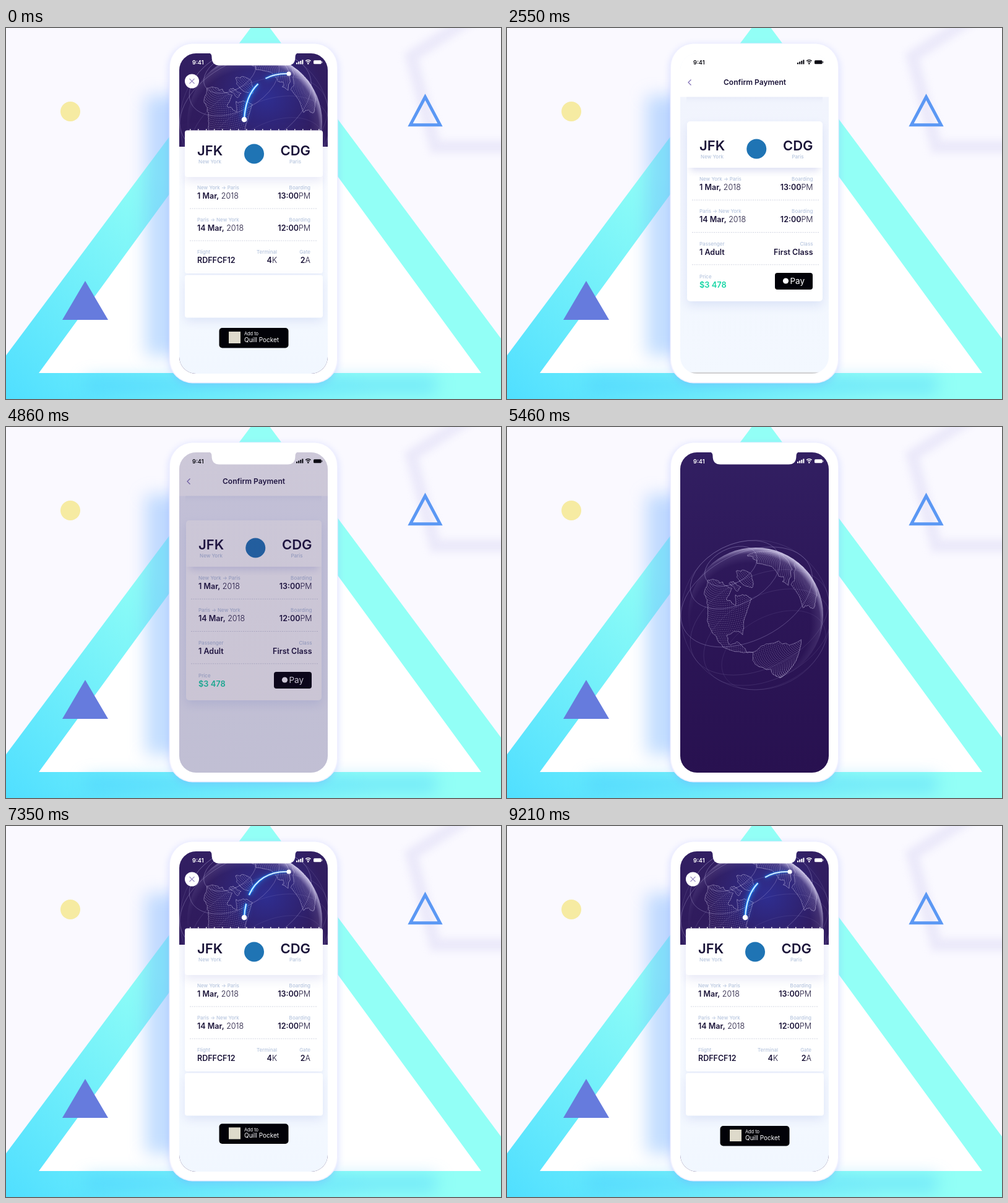
Recreate the animation shown at these times as an HTML page with a canvas. Size 800 by 600 pixels, loop 9.24 s.

```html
<!DOCTYPE html>
<html lang="en">
<head>
<meta charset="utf-8">
<title>Boarding pass payment</title>
<style>
  html, body { margin: 0; width: 100%; height: 100%; overflow: hidden; background: #faf9ff; }
  canvas { display: block; }
</style>
</head>
<body>
<canvas id="stage" width="800" height="600"></canvas>
<script>
const LOOP = 9240, INK = '#1a1338', MUTED = '#b6c5de', BLUE = '#1583f5', GREY = '#929296';
const RAD = Math.PI / 180;
const stage = document.getElementById('stage');
let c = stage.getContext('2d');
let t = 0;

// timing
const seg = (a, b) => Math.min(1, Math.max(0, (t - a) / (b - a)));
const easeOut = u => 1 - (1 - u) ** 3;
const easeInOut = u => u < .5 ? 4 * u ** 3 : 1 - (2 - 2 * u) ** 3 / 2;

// drawing helpers
function group(alpha, dx, dy, draw) {
  if (alpha <= 0) return;
  c.save();
  c.globalAlpha *= alpha;
  c.translate(dx, dy);
  draw();
  c.restore();
}
function box(x, y, w, h, r, fill, shadow, blur = 16, drop = 7) {
  c.save();
  if (shadow) {
    c.shadowColor = shadow;
    c.shadowBlur = blur;
    c.shadowOffsetY = drop;
  }
  c.fillStyle = fill;
  c.beginPath();
  c.roundRect(x, y, w, h, r);
  c.fill();
  c.restore();
}
function dot(x, y, r, fill) {
  c.fillStyle = fill;
  c.beginPath();
  c.arc(x, y, r, 0, 7);
  c.fill();
}
function line(points, color, width = 1, dash = []) {
  c.strokeStyle = color;
  c.lineWidth = width;
  c.setLineDash(dash);
  c.beginPath();
  points.forEach(p => c.lineTo(...p));
  c.stroke();
  c.setLineDash([]);
}
function poly(points, fill) {
  c.fillStyle = fill;
  c.beginPath();
  points.forEach(p => c.lineTo(...p));
  c.fill();
}
function fade(x0, y0, x1, y1, ...colors) {
  const g = c.createLinearGradient(x0, y0, x1, y1);
  colors.forEach((k, i) => g.addColorStop(i / (colors.length - 1), k));
  return g;
}
const setFont = (weight, size) => c.font = `${weight} ${size}px Inter, "Open Sans", sans-serif`;
// y is the middle of the capitals
function text(s, x, y, size, weight, color, align = 'left') {
  setFont(weight, size);
  c.textAlign = align;
  c.fillStyle = color;
  c.fillText(s, x, y + size * .36);
}
function pair(bold, light, x, y, right) {
  setFont(600, 12.5);
  const wb = c.measureText(bold).width;
  setFont(300, 12.5);
  const wl = c.measureText(light).width;
  if (right) x -= wb + wl;
  text(bold, x, y, 12.5, 600, INK);
  text(light, x + wb, y, 12.5, 300, INK);
}
function field(label, bold, light, x, y, right) {
  text(label, x, y, 8, 500, MUTED, right ? 'right' : 'left');
  pair(bold, light, x, y + 13, right);
}
const rule = (x0, x1, y) => line([[x0, y], [x1, y]], '#d3d6e2', 1, [2, 1.5]);

// backdrop, painted once
function paintBackdrop() {
  c.fillStyle = '#faf9ff';
  c.fillRect(0, 0, 800, 600);
  c.filter = 'blur(6px)';
  line([[830, -60], [735, -6], [655, 46], [694, 192], [830, 192]], '#ebe9fa', 20);
  c.filter = 'none';
  poly([[411, -21], [-60, 610], [880, 610]], fade(0, 600, 300, 290, '#50dfff', '#92fff6'));
  poly([[410.5, 68], [53, 558], [768, 558]], '#fff');
  c.filter = 'blur(14px)';
  c.fillStyle = 'rgba(110,175,255,.42)';
  c.fillRect(226, 110, 80, 420);
  c.fillStyle = 'rgba(70,200,255,.5)';
  c.fillRect(130, 567, 565, 22);
  c.filter = 'none';
  dot(104, 135, 16, '#f6eba2');
  poly([[128, 409], [91, 472], [165, 472]], '#667bdd');
  c.strokeStyle = '#5b98f4';
  c.lineWidth = 5;
  c.beginPath();
  [[677.5, 111.5], [653.5, 156.7], [701.5, 156.7]].forEach(p => c.lineTo(...p));
  c.closePath();
  c.stroke();
  box(263.5, 24.5, 273, 550, 38, '#f0f0ff', 'rgba(130,150,255,.3)', 12, 3);
  box(265, 25.5, 270, 547.5, 37, '#fff');
}

// globe: a few corners per land mass, coasts roughened by seeded midpoints
const northAmerica = [
  [-166, 66], [-156, 71], [-95, 71], [-82, 68], [-94, 59], [-80, 52], [-77, 61], [-65, 59],
  [-56, 52], [-66, 46], [-75, 38], [-81, 26], [-84, 30], [-97, 28], [-96, 19], [-88, 21],
  [-83, 9], [-78, 8], [-105, 20], [-118, 34], [-124, 48], [-150, 60]
];
const greenland = [[-60, 77], [-52, 64], [-44, 60], [-22, 70], [-18, 78], [-40, 83]];
const baffin = [[-90, 73], [-74, 73], [-62, 66], [-74, 65]];
const southAmerica = [[-78, 8], [-62, 10], [-35, -6], [-48, -27], [-70, -50], [-71, -18], [-81, -5]];
const africa = [[-17, 15], [-6, 35], [30, 31], [40, 10], [10, 4], [-8, 5]];
const europe = [[-9, 37], [-9, 43], [-1, 44], [-4, 48], [10, 55], [15, 68], [60, 70], [45, 38]];

let seed = 7;
const random = () => (seed = seed * 16807 % 2147483647) / 2147483647;
function roughen(shape) {
  return shape.flatMap(([x, y], i) => {
    const [x2, y2] = shape[(i + 1) % shape.length];
    const shift = (random() - .5) * Math.min(4, .3 * Math.hypot(x2 - x, y2 - y));
    return [[x, y], [(x + x2) / 2 + shift, (y + y2) / 2 + shift]];
  });
}
const lands = [northAmerica, greenland, baffin, southAmerica, africa, europe]
  .map(shape => roughen(roughen(roughen(shape))));

function inside(x, y, shape) {
  let hit = false;
  shape.forEach(([x1, y1], i) => {
    const [x2, y2] = shape[(i + 1) % shape.length];
    if ((y1 > y) !== (y2 > y) && x < (x2 - x1) * (y - y1) / (y2 - y1) + x1) hit = !hit;
  });
  return hit;
}
const landDots = [];
for (let lat = -50; lat < 84; lat += 1.7)
  for (let lon = -170; lon < 60; lon += 1.7 / Math.cos(lat * RAD))
    if (lands.some(s => inside(lon, lat, s))) landDots.push([lon, lat]);

const R = 109, TILT = 38 * RAD, ROLL = 27 * RAD;
function project([lon, lat], lon0) {
  const d = (lon - lon0) * RAD, f = lat * RAD;
  const x = Math.cos(f) * Math.sin(d);
  const y = Math.sin(TILT) * Math.cos(f) * Math.cos(d) - Math.cos(TILT) * Math.sin(f);
  const z = Math.sin(TILT) * Math.sin(f) + Math.cos(TILT) * Math.cos(f) * Math.cos(d);
  return [
    R * (x * Math.cos(ROLL) + y * Math.sin(ROLL)),
    R * (y * Math.cos(ROLL) - x * Math.sin(ROLL)),
    z
  ];
}
function orbit(lat, alpha) {
  const r = 121 * Math.cos(lat * RAD), up = 121 * Math.sin(lat * RAD) * Math.cos(TILT);
  c.strokeStyle = `rgba(200,190,235,${alpha})`;
  c.lineWidth = .9;
  c.beginPath();
  c.ellipse(-up * Math.sin(ROLL), -up * Math.cos(ROLL), r, r * Math.sin(TILT), -ROLL, 0, 7);
  c.stroke();
}
function drawGlobe(lon0) {
  const glow = c.createRadialGradient(18, -40, 0, 18, -40, 95);
  glow.addColorStop(0, `rgba(44,70,215,${.42 * seg(5660, 6700)})`);
  glow.addColorStop(1, 'rgba(44,70,215,0)');
  c.fillStyle = glow;
  c.fillRect(-122, -140, 244, 240);

  const rim = c.createRadialGradient(-8, 13, R - 12, -8, 13, R + 15);
  rim.addColorStop(0, 'rgba(200,190,235,0)');
  rim.addColorStop(.55, 'rgba(205,195,240,.12)');
  rim.addColorStop(1, 'rgba(235,230,255,.85)');
  dot(0, 0, R, rim);

  c.fillStyle = 'rgba(222,215,245,.55)';
  landDots.forEach(p => {
    const [x, y, z] = project(p, lon0);
    if (z > .02) c.fillRect(x, y, .9, .9);
  });
  c.strokeStyle = 'rgba(225,218,248,.5)';
  c.lineWidth = .8;
  c.beginPath();
  lands.forEach(shape => {
    const pts = [...shape, shape[0]].map(p => project(p, lon0));
    pts.forEach(([x, y, z], i) => z > 0 && i && pts[i - 1][2] > 0 ? c.lineTo(x, y) : c.moveTo(x, y));
  });
  c.stroke();
  [[68, .4], [50, .34], [20, .34], [-8, .16], [-25, .14], [-42, .12]].forEach(o => orbit(...o));
  c.beginPath();
  c.arc(0, 0, 121, 0, 7);
  c.strokeStyle = 'rgba(200,190,235,.16)';
  c.stroke();
}
function drawRoute() {
  const run = .0915 * (t - 5664);
  if (run > 0) {
    const trace = (color, width) => {
      c.strokeStyle = color;
      c.lineWidth = width;
      c.beginPath();
      c.moveTo(-17, -4);
      c.bezierCurveTo(-15, -48, 8, -80, 55, -78);
      c.stroke();
    };
    c.save();
    c.setLineDash(run < 132 ? [run, 999] : [117, 15]);
    c.lineDashOffset = run < 132 ? 0 : 117 - run;
    c.shadowColor = '#168cff';
    c.shadowBlur = 10;
    trace(fade(-17, -4, 40, -78, '#1c86ff', '#1f8dff', 'rgba(60,140,255,.25)'), 3.6);
    c.shadowBlur = 3;
    trace('#e4f5ff', 1.7);
    c.restore();
  }
  dot(-17, -4, 4.3 * easeOut(seg(5500, 5660)), '#fff');
  dot(55, -78, 3.6 * easeOut(seg(6900, 7050)), '#fff');
}

// shared parts
function status(color) {
  text('9:41', 301, 55.5, 9.2, 600, color);
  c.fillStyle = color;
  for (let i = 0; i < 4; i++) c.fillRect(469 + i * 3.1, 56 - i * 1.5, 2.1, 2.5 + i * 1.5);
  c.strokeStyle = color;
  c.lineWidth = 1.5;
  [2.6, 5.2].forEach(r => {
    c.beginPath();
    c.arc(488.3, 58, r + 1, -2.3, -.84);
    c.stroke();
  });
  dot(488.3, 57.5, 1.3, color);
  box(497, 52.3, 12.6, 6, 1.5, color);
  c.fillRect(510.2, 54, 1, 2.6);
}
function notch() {
  c.fillStyle = '#fff';
  c.beginPath();
  c.moveTo(327, 40);
  c.quadraticCurveTo(332.5, 41, 332.5, 47);
  c.quadraticCurveTo(332.5, 60.5, 345, 60.5);
  c.lineTo(455, 60.5);
  c.quadraticCurveTo(467.5, 60.5, 467.5, 47);
  c.quadraticCurveTo(467.5, 41, 473, 40);
  c.fill();
}
function route(x0, x1, y) {
  text('JFK', x0, y, 22, 600, INK);
  text('CDG', x1, y, 22, 600, INK, 'right');
  text('New York', x0 + 20.5, y + 18, 8, 500, MUTED, 'center');
  text('Paris', x1 - 24.5, y + 18, 8, 500, MUTED, 'center');
  dot((x0 + x1) / 2 + .5, y + 5, 16, '#1f74b4');
}
function trip(x0, x1, y, from, to, day, hour) {
  field(`${from} → ${to}`, day, ' 2018', x0, y);
  field('Boarding', hour, 'PM', x1, y, true);
}

// payment screen
function confirmScreen() {
  c.fillStyle = fade(0, 111, 0, 559, '#f1f4fd', '#f3f8ff');
  c.fillRect(280, 41, 240, 518);
  c.fillStyle = fade(0, 111, 0, 123, '#e6eaf8', 'rgba(238,242,252,0)');
  c.fillRect(290, 111, 220, 12);
  c.fillStyle = '#fff';
  c.fillRect(280, 41, 240, 70.5);
  group(seg(630, 900), 0, 0, () => {
    line([[297.5, 83.5], [293, 88], [297.5, 92.5]], '#7f6fb5', 1.2);
    text('Confirm Payment', 400.5, 88, 12, 600, INK, 'center');
  });
  if (t < 630) return;
  group(1, 0, 410 * (1 - easeOut(seg(630, 1350))), () => {
    box(291, 151, 219, 291, 5, '#fff', 'rgba(100,125,210,.16)');
    c.save();
    c.beginPath();
    c.rect(291, 226, 219, 14);
    c.clip();
    box(296, 160, 209, 66, 5, '#fff', 'rgba(100,110,200,.22)', 12, 5);
    c.restore();
    route(311, 494.5, 190.5);
  });
  const rows = [
    () => trip(311, 494.5, 244.5, 'New York', 'Paris', '1 Mar,', '13:00'),
    () => trip(311, 494.5, 296.5, 'Paris', 'New York', '14 Mar,', '12:00'),
    () => {
      field('Passenger', '1 Adult', '', 311, 349);
      field('Class', 'First Class', '', 494.5, 349, true);
    },
    () => {
      text('Price', 311, 402, 8, 500, MUTED);
      text('$3 478', 311, 415, 12.8, 600, '#17d6a5');
      box(433, 396, 61, 27, 4, '#020208');
      dot(450.5, 409, 4.6, '#fff');
      text('Pay', 457.5, 409, 13.5, 400, '#fff');
    }
  ];
  rows.forEach((draw, i) => {
    const u = easeOut(seg(920 + i * 90, 1320 + i * 90));
    group(u, 0, 30 * (1 - u), () => {
      draw();
      if (i < 3) rule(299, 504, 278.2 + i * 52.3);
    });
  });
}
function paySheet() {
  const small = (s, x, y, color = '#111', align) => text(s, x, y, 8, 400, color, align);
  c.fillStyle = '#d1d1d2';
  c.fillRect(280, 267, 240, 292);
  dot(294, 281, 4.5, '#222');
  text('Pay', 300, 280.5, 12.5, 300, '#222');
  text('Cancel', 511, 281, 11, 400, BLUE, 'right');
  small('CARD', 290, 311, GREY);
  small('BANK OF HARBOR CREDIT', 351, 311);
  small('(•••• 4242)', 351, 322);
  small('SHIPPING', 290, 353, GREY);
  small('MIRA FENWORTH', 351, 353);
  small('8 WINDING LANE', 351, 363.5);
  small('FERNBROOK, CA 90000', 351, 374);
  small('CONTACT', 290, 405.5, GREY);
  small('HELLO@EXAMPLE.COM', 351, 405.5);
  [316, 363.5, 405.5].forEach(y => line([[506, y - 4], [510, y], [506, y + 4]], BLUE, 1.3));
  small('SUBTOTAL', 351, 437.5, GREY);
  small('$3 477.00', 511, 437.5, GREY, 'right');
  small('$1.00', 511, 450, GREY, 'right');
  small('TO MERCHANT LTD.', 351, 470.5);
  text('$3 478', 511, 469, 12.8, 400, '#111', 'right');
  line([[280, 488.5], [520, 488.5]], '#c6c6c9');

  c.strokeStyle = BLUE;
  c.lineWidth = 1.5;
  c.beginPath();
  c.arc(400, 515, 13.2, -Math.PI / 2, -Math.PI / 2 + 2 * Math.PI * easeInOut(seg(3100, 3850)));
  c.stroke();
  const u = seg(3850, 4100);
  if (u > 0) {
    c.save();
    c.beginPath();
    c.rect(390, 505, 20 * u, 20);
    c.clip();
    line([[394.5, 515.5], [398.5, 519.5], [406, 511]], BLUE, 1.5);
    c.restore();
  }
  group(u, 0, 0, () => text('Готово', 400, 540, 10.5, 400, '#111', 'center'));
  box(357, 556.5, 87, 2, 1, '#111');
}

// boarding pass screen
function passScreen() {
  c.fillStyle = fade(0, 41, 0, 559, '#321f62', '#2c1657', '#281150');
  c.fillRect(280, 41, 240, 518);
  const rise = easeInOut(seg(5975, 6725));
  group(seg(4900, 5340), 402, 304 - 152 * rise, () => {
    drawGlobe(-61 - 3 * rise);
    drawRoute();
  });
  if (t < 5940) return;

  const top = 192 + 367 * (1 - easeInOut(seg(5949, 6699)));
  c.save();
  if (top > 192.1) {
    c.shadowColor = '#fff';
    c.shadowBlur = 8;
  }
  c.fillStyle = fade(0, 192, 0, 559, '#fbfcff', '#f1f7ff');
  c.fillRect(280, top, 240, 560 - top);
  c.restore();

  const rows = [
    () => {
      box(289, 236, 223, 161, 4, '#fff', 'rgba(100,125,210,.1)', 10, 3);
      trip(309, 492, 258, 'New York', 'Paris', '1 Mar,', '13:00');
      rule(297, 503, 292);
    },
    () => {
      trip(309, 492, 310, 'Paris', 'New York', '14 Mar,', '12:00');
      rule(297, 503, 344);
    },
    () => {
      field('Flight', 'RDFFCF12', '', 309, 362.5);
      field('Terminal', '4', 'K', 438, 362.5, true);
      field('Gate', '2', 'A', 492, 362.5, true);
    },
    () => box(289, 399.5, 223, 69, 4, '#fff', 'rgba(100,125,210,.16)', 16, 6)
  ];
  rows.forEach((draw, i) => {
    const u = easeOut(seg(6480 + i * 110, 6830 + i * 110));
    group(u, 0, 24 * (1 - u), draw);
  });
  group(1, 0, 394 * (1 - rise), () => {
    box(289, 165.5, 223, 75.5, 4, '#fff', 'rgba(100,110,200,.15)', 16, 7);
    c.fillStyle = '#fff';
    for (let x = 297; x < 510; x += 13) c.fillRect(x, 163.5, 1.5, 2);
    route(309, 492, 198.5);
  });
  const pop = easeOut(seg(6800, 7100));
  group(pop, 300.5, 86, () => {
    c.scale(pop, pop);
    dot(0, 0, 11.5, '#fff');
    line([[-4, -4], [4, 4]], '#9a8cc4', 1.1);
    line([[4, -4], [-4, 4]], '#9a8cc4', 1.1);
  });
  const age = t - 6920;
  const bounce = 27 * Math.exp(-.004 * age) * Math.cos(.00554 * age);
  group(seg(6920, 7200), 0, bounce, () => {
    box(344.5, 485, 112, 32.5, 5, '#020208');
    box(360, 491, 19, 19, 0, '#dedacb');
    text('Add to', 385, 494.5, 7.4, 400, '#fff');
    text('Quill Pocket', 385, 504, 10, 400, '#fff');
  });
}

const backdrop = document.createElement('canvas');
backdrop.width = 800;
backdrop.height = 600;
const front = c;
c = backdrop.getContext('2d');
paintBackdrop();
c = front;

const start = performance.now();
function frame() {
  t = (performance.now() - start) % LOOP;
  if (t < 30) t += LOOP; // the pass stays up until the hard cut
  c.drawImage(backdrop, 0, 0);
  c.save();
  c.beginPath();
  c.roundRect(280, 41, 240, 518, 27);
  c.clip();
  const dim = seg(2550, 2900) * (1 - seg(4410, 4770));
  if (t < 5250) {
    group(1, 0, dim, confirmScreen);
    c.fillStyle = `rgba(0,0,0,${.4 * dim})`;
    c.fillRect(280, 41, 240, 518);
    const hidden = 1 - easeOut(seg(2550, 2950)) + seg(4410, 4750) ** 2;
    if (hidden < 1) group(1, 0, 292 * hidden, paySheet);
  }
  const dark = seg(4750, 5200);
  group(dark, 0, 0, passScreen);
  if (dark > .5) status('#fff');
  else status(dim > .5 ? 'rgba(255,255,255,.65)' : '#0c0c14');
  notch();
  c.restore();
  requestAnimationFrame(frame);
}
frame();
</script>
</body>
</html>
```
